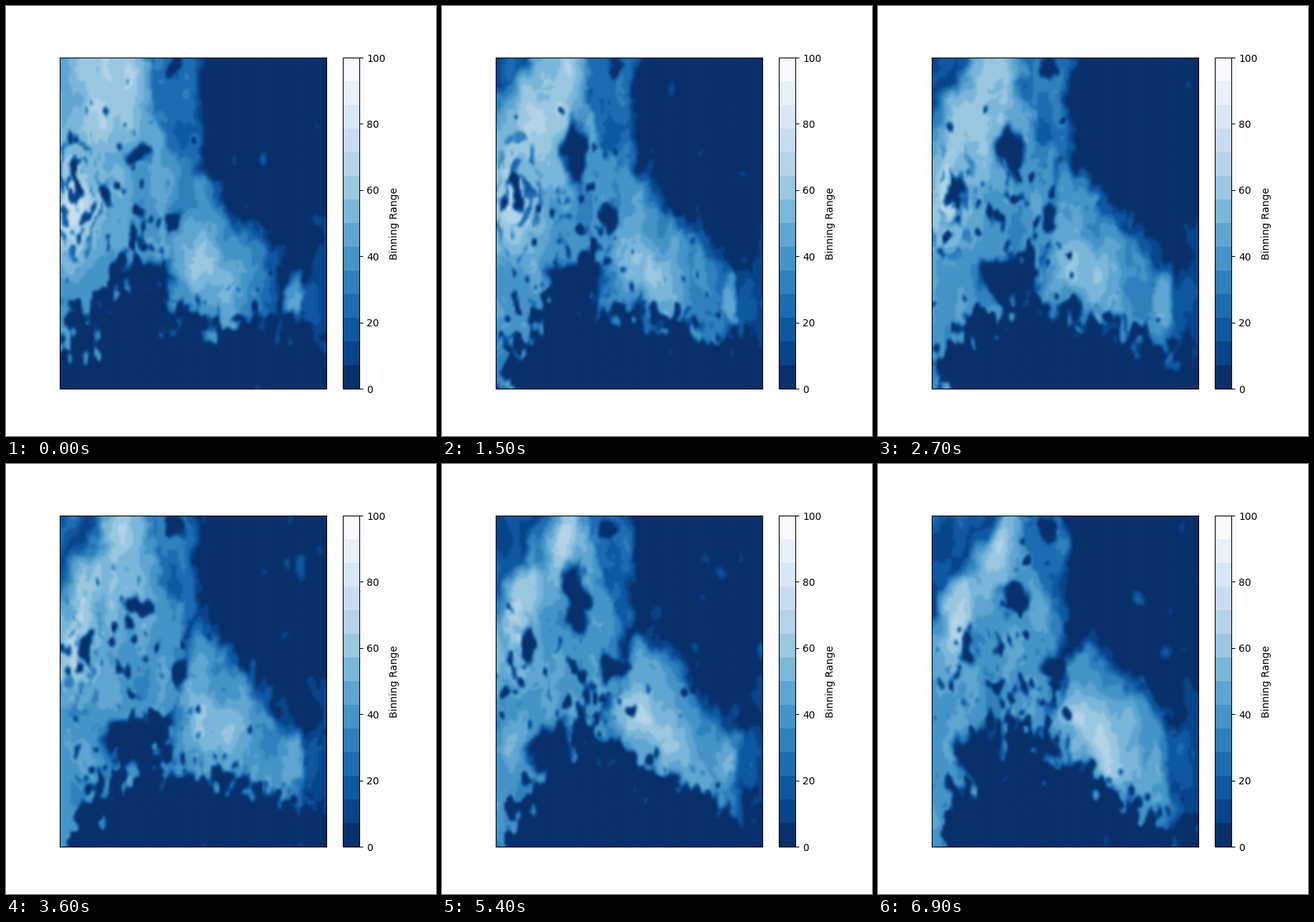
These frames come from a looping animation (600x600 px, 7.2 s). A matplotlib script:

```python
import numpy as np
import matplotlib.pyplot as plt
from matplotlib.animation import FuncAnimation

FRAMES, INTERVAL = 24, 300
LEFT, TOP, WIDTH, HEIGHT = 75, 72, 372, 462
STEP = 3
X, Y = np.meshgrid(LEFT + np.arange(STEP / 2, WIDTH, STEP),
                   TOP + np.arange(STEP / 2, HEIGHT, STEP))
U, V = X - LEFT, Y - TOP
rng = np.random.default_rng(14)


def noise(span, height, width):
    """Smooth random field over time, y and x, with unit deviation."""
    n = rng.normal(size=(FRAMES + 8,) + X.shape)
    spec = np.fft.fftn(n)
    for axis, s in enumerate((span, height / STEP, width / STEP)):
        shape = [1, 1, 1]
        shape[axis] = -1
        freq = np.fft.fftfreq(n.shape[axis])
        spec = spec * np.exp(-2 * (np.pi * s * freq) ** 2).reshape(shape)
    n = np.fft.ifftn(spec).real
    return n / n.std()


sway_x, sway_y = noise(3, 14, 10), noise(3, 14, 10)
fray_x, fray_y = noise(1.5, 6, 4), noise(1.5, 6, 4)
streak = noise(1.4, 7, 3.6)
speck = noise(1.4, 5.5, 3.4)
texture = noise(2.5, 20, 8)
wisp = noise(1.3, 9, 5)


def soft(d, width=1.0):
    """Step from 0 to 1 around d = 0."""
    return 1 / (1 + np.exp(-np.clip(d / width, -40, 40)))


def mix(a, b, p):
    return a + (b - a) * p


def radius(x, y, cx, cy, rx, ry, slant=0):
    return np.hypot((x - cx - slant * (y - cy)) / rx, (y - cy) / ry)


def bump(*args):
    return np.exp(-radius(*args) ** 2)


def oval(*args):
    return soft(1 - radius(*args), 0.12)


def west_cloud(x, y, p, t):
    """Band from the top edge down to the left edge, pulling away from the corner."""
    right = 203 + 10 * p + 42 * soft(y - 175, 14)
    base = np.maximum(355, 470 + 45 * np.sin(np.pi * p) - 1.15 * (x - LEFT))
    base += 160 * p * np.exp(-np.maximum(x - LEFT, 0) / 18)
    ridge = mix(140, 185, p) - mix(0.2, 0.55, p) * (y - TOP)
    glow = np.exp(-((x - ridge) / mix(62, 34, p)) ** 2) * soft(mix(360, 290, p) - y, 18)
    corner = (x - LEFT + 0.65 * (y - TOP)) - 90 * np.sqrt(p)
    value = 41 + 19 * glow
    value += 6 * bump(x, y, mix(150, 182, p), 115, mix(30, 12, p), 40)
    value += 9 * bump(x, y, mix(98, 118, p), 280, 22, 50)
    mask = soft(right - x, 4) * soft(base - y + 30 * streak[t], 5)
    mask = mask * mix(1, soft(corner, 10), min(1, 5 * p))
    haze = (15 + 4 * texture[t]) * soft(-corner, 10) * min(1, 4 * p)
    haze += 18 * p ** 4 * bump(x, y, 78, 74, 36, 24)
    return np.maximum(value * mask, haze), base


def front_cloud(x, y, p, t):
    """Wedge drifting south-east, with a bright crest along its inner side."""
    edge = 233 + 50 * p + 0.86 * (y - 190 - 38 * p)
    edge = np.minimum(edge, 366 + 42 * min(1, 3 * p))
    base = mix(432, 382, p) + mix(0.1, 0.68, p) * (x - 225)
    back = 225 + 0.5 * p * (370 - y)
    crest = bump(x, y, mix(285, 298, p), mix(362, 365, p), 38, 75, mix(0.45, 0.6, p))
    hot = bump(x, y, mix(258, 266, p), mix(375, 350, p), 24, 32)
    value = mix(35, 40, p) + 22 * crest + 9 * hot
    shape = soft(x - back, 4) * soft(base - y + 17 * streak[t], 5)
    fringe = 16 * soft(edge + 14 - x + 10 * streak[t], 4)
    return np.maximum(value * soft(edge - x, 7), fringe) * shape, base


def field(t):
    p = t / (FRAMES - 1)
    x = X + 4 * sway_x[t] + 2.5 * fray_x[t]
    y = Y + 5 * sway_y[t] + 4 * fray_y[t]

    west, west_base = west_cloud(x, y, p, t)
    front, front_base = front_cloud(x, y, p, t)
    veil = 25 * soft(mix(270, 262, p) - x, 4) * soft(225 - y, 5) * soft(x - 185, 5)
    east = 13 * soft(x - 432 + 6 * streak[t], 3) * soft(y - 300, 8) * soft(480 - y, 8)
    blob = 46 * oval(x, y, mix(402, 382, p), mix(402, 418, p), mix(14, 18, p), 38)
    shade = 17 * oval(x, y, 424, 415, 18, 45)
    f = np.max([west, front, veil, east, blob, shade], axis=0)
    f += (3.5 * texture[t] + 1.5 * speck[t]) * soft(f - 16, 4)

    # Breaks in the cloud, densest in the middle and along the lower edges
    loose = np.max([
        0.85 * bump(X, Y, 180, 290, 60, 100),
        0.85 * np.exp(-((Y - west_base) / 60) ** 2) * soft(240 - X, 10),
        0.85 * np.exp(-((Y - front_base) / 28) ** 2) * soft(X - 225, 10),
        0.8 * bump(X, Y, 100, mix(250, 310, p), 32, 85),
    ], axis=0)
    f *= 1 - 0.9 * soft(speck[t] - 2.6 + 2.1 * loose, 0.2)

    # Curved dark bands turning around the western swirl, fading out
    r = radius(x, y, 102, 268, 28, 72)
    rings = soft(np.sin(13 * r) + 0.7 * streak[t] - 0.8, 0.16) * soft(1.15 - r, 0.1)
    f *= 1 - 0.8 * max(0, 1 - p) * rings

    notch = 33 - 18 * np.cos(2 * np.pi * t / 12.5)
    holes = [
        (mix(184, 187, p), mix(208, 182, p), 15, notch, 0.1),
        (236, 86, 10, 17),
        (mix(100, 127, p), 255, mix(4, 11, p), 26),
        (mix(232, 250, p), mix(300, 284, p), mix(8, 17, p), 17),
        (mix(195, 142, p), mix(375, 397, p), 30, mix(18, 32, p)),
        (266, 345, 9 * p, 13 * p + 1),
    ]
    for cx, cy, rx, *rest in holes:
        f *= 1 - oval(x, y, cx, cy, rx + 0.1, *rest)

    # Thin scattered patches over the clear eastern side
    scatter = 10 * np.maximum(wisp[t] - 1.4, 0) * soft(X - 270, 12)
    return np.clip(np.maximum(f, scatter), 0, 100)


fig, ax = plt.subplots(figsize=(6, 6), dpi=100)
image = ax.imshow(field(0), cmap=plt.get_cmap("Blues_r", 14), vmin=0, vmax=100,
                  aspect="auto", interpolation="bicubic", interpolation_stage="rgba")
ax.set_xticks([])
ax.set_yticks([])
fig.colorbar(image, ax=ax, label="Binning Range")


def draw(t):
    image.set_data(field(t))
    return [image]


anim = FuncAnimation(fig, draw, frames=FRAMES, interval=INTERVAL, repeat=True, repeat_delay=0)
plt.show()
```
